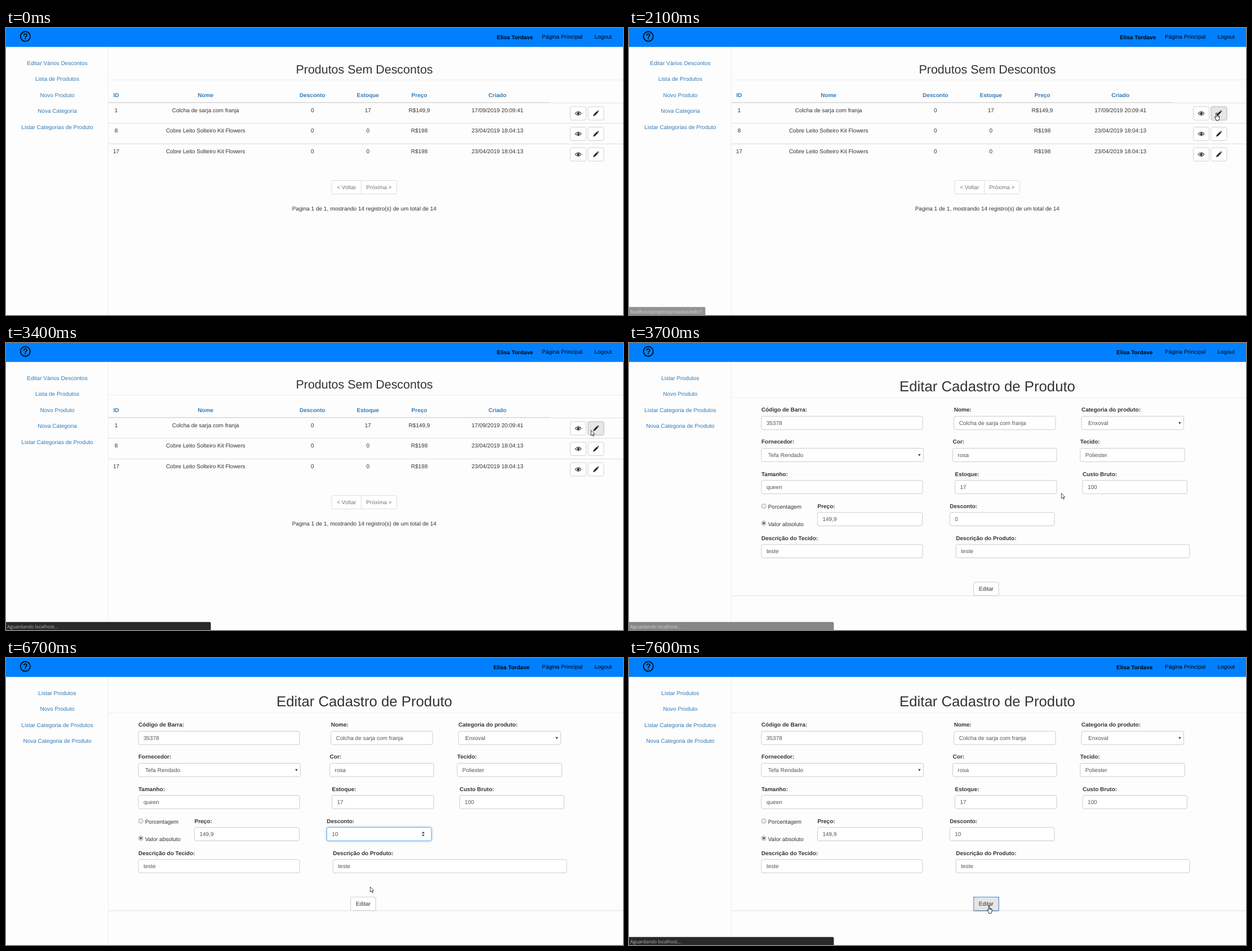
Animation, 1095 px wide and 511 px high, one loop 8000 ms. Source, as an HTML page:

```html
<!DOCTYPE html>
<html lang="pt-BR">
<head>
<meta charset="utf-8">
<title>Cadastro de produtos</title>
<style>
  html, body { margin: 0; width: 100%; height: 100%; overflow: hidden; background: #fdfdfd; }
  svg { display: block; width: 100%; height: 100%; }
  text { font: 10px "Liberation Sans", Arial, sans-serif; fill: #333; text-rendering: geometricPrecision; white-space: pre; }
  .bold { font-weight: bold; }
  .black { fill: #000; }
  .link { fill: #337ab7; }
  .muted { fill: #777; }
  .value { fill: #555; }
  .white { fill: #fff; }
  .h2 { font-size: 21.45px; }
  .h1 { font-size: 25.74px; }
  .tip { font-size: 8.6px; fill: #575757; }
  .status { font: 8.2px "Open Sans", "Noto Sans", sans-serif; fill: #b4b6b8; }
  .glow { filter: drop-shadow(0 0 2px rgba(102, 175, 233, .7)); }
</style>
</head>
<body>
<svg id="stage" viewBox="0 0 1095 511" preserveAspectRatio="none"></svg>
<script>
const LOOP = 8000, STEP = 100;
const stage = document.getElementById('stage');

const text = (x, y, str, cls = '', anchor = 'start') =>
  `<text x="${x}" y="${y}" class="${cls}" text-anchor="${anchor}">${str}</text>`;
const centered = (x, y, str, cls) => text(x, y, str, cls, 'middle');
const rect = (x, y, w, h, fill, stroke = 'none', rx = 0, extra = '') =>
  `<rect x="${x}" y="${y}" width="${w}" height="${h}" rx="${rx}" fill="${fill}" stroke="${stroke}" ${extra}/>`;
const line = (x1, y1, x2, y2, color, width = 1) =>
  `<path d="M${x1} ${y1}L${x2} ${y2}" stroke="${color}" stroke-width="${width}"/>`;
const at = (x, y, body) => `<g transform="translate(${x} ${y})">${body}</g>`;
const between = (t, a, b) => t >= a && t < b;
const ramp = (t, a, b) => Math.min(1, Math.max(0, (t - a) / (b - a)));

const eye = `<path d="M-5.4 0Q0-6.6 5.4 0Q0 6.6-5.4 0Z" fill="none" stroke="#222" stroke-width="1.1"/>
  <circle r="2.3" fill="#222"/><circle cx="-.8" cy="-.9" r=".7" fill="#fff"/>`;
const pencil = `<path d="M-5 5L-4.1 1.9 1.7-3.9 3.9-1.7-1.9 4.1ZM2.4-4.5L3.3-5.2Q3.8-5.5 4.3-5L5-4.3Q5.5-3.8 5.2-3.3L4.5-2.4Z" fill="#222"/>`;

const cursors = {
  arrow: `<path d="M.4.4V9.7L2.5 7.8 4 11.2 5.4 10.6 3.9 7.3H6.7Z" fill="#fff" stroke="#222" stroke-width=".8"/>`,
  hand: `<path d="M-.9 8.4V1Q-.9 0 0 0T.9 1V4.9L2 4.6 2.4 5.2 3.5 5 3.9 5.7 5.1 5.7V9.6Q4.9 11.2 4.1 12.1V13.6H-.6V12.2L-3.1 8.5Q-3.6 7.2-2.5 7.1Z"
    fill="#fff" stroke="#111" stroke-width=".9"/><path d="M1 5V7.4M2.5 5.3V7.4M3.9 5.8V7.4" stroke="#111" stroke-width=".7"/>`,
  beam: `<path d="M-2-6H-.4L0-5.6.4-6H2M0-5.6V5.6M-2 6H-.4L0 5.6.4 6H2" fill="none" stroke="#222" stroke-width=".9"/>`
};

// Pointer way points: time, x, y, shape
const pointerPath = [
  [200, 60, 1, 'arrow'], [300, 723, 272, 'arrow'], [400, 566, 159, 'arrow'], [500, 566, 159, 'arrow'],
  [900, 664, 171, 'arrow'], [1000, 664, 171, 'arrow'], [1200, 715, 171, 'arrow'], [1400, 840, 168, 'arrow'],
  [1600, 960, 162, 'arrow'], [1700, 1012, 157, 'hand'], [1900, 1040, 153, 'hand'], [2100, 1042.5, 151, 'hand'],
  [3300, 1038, 155, 'arrow'], [3400, 1038, 155, 'arrow'], [3500, 995, 177, 'arrow'], [3700, 767, 267, 'arrow'],
  [3800, 690, 298, 'arrow'], [3900, 645, 313, 'beam'], [4000, 631, 320, 'beam'], [4500, 0, 0, ''],
  [6100, 631, 316, 'beam'], [6200, 630, 326, 'arrow'], [6400, 626, 355, 'arrow'], [6600, 626, 355, 'arrow'],
  [6700, 646, 407, 'arrow'], [6800, 643, 428, 'hand'], [7000, 639, 441, 'hand']
];

function pointerAt(t) {
  const i = pointerPath.findLastIndex(p => p[0] <= t);
  if (i < 0) return { shape: '' };
  const [t0, x0, y0, shape] = pointerPath[i];
  const [t1, x1, y1, nextShape] = pointerPath[i + 1] || pointerPath[i];
  // A pointer that changes shape after a rest, or vanishes, stays put until then
  const k = nextShape && t1 - t0 <= 400 ? ramp(t, t0, t1 || t0 + 1) : 0;
  return { x: t1 > t0 ? x0 + (x1 - x0) * k : x0, y: t1 > t0 ? y0 + (y1 - y0) * k : y0, shape };
}

function frame(name, nameX, links, lineY) {
  return rect(0, 0, 1095, 511, '#fdfdfd') + rect(0, 0, 1095, 33.7, '#0080ff') +
    `<circle cx="34.3" cy="15" r="8.6" fill="none" stroke="#000" stroke-width="1.7"/>` +
    `<path d="M31.7 13.2Q31.7 10.5 34.3 10.5T36.9 13Q36.9 14.2 35.4 15.2Q34.3 15.9 34.3 17.2" fill="none" stroke="#000" stroke-width="1.6"/>` +
    rect(33.4, 18.3, 1.8, 1.8, '#000') +
    text(nameX, 20, name, 'bold black') + text(951, 18.6, 'Página Principal', 'black') + text(1044.5, 18.6, 'Logout', 'black') +
    line(181.5, 34, 181.5, 511, '#eee') + line(182, lineY, 1095, lineY, '#eee') +
    links.map((link, i) => centered(91, 65.6 + 28.5 * i, link, 'link')).join('');
}

function iconButton(x, y, icon, hover) {
  return rect(x, y, 28, 24, hover ? '#e6e6e6' : '#fff', hover ? '#adadad' : '#ccc', 2.8, 'stroke-width=".9"') +
    at(x + 14, y + 12, icon);
}

const columns = [195.5, 354.2, 543.8, 642.2, 733.5, 872.2];
const headings = ['ID', 'Nome', 'Desconto', 'Estoque', 'Preço', 'Criado'];
const products = [
  ['1', 'Colcha de sarja com franja', '0', '17', 'R$149,9', '17/09/2019 20:09:41'],
  ['8', 'Cobre Leito Solteiro Kit Flowers', '0', '0', 'R$198', '23/04/2019 18:04:13'],
  ['17', 'Cobre Leito Solteiro Kit Flowers', '0', '0', 'R$198', '23/04/2019 18:04:13']
];

function listPage(t, pointer) {
  const cells = (row, y, cls) => row.map((cell, i) => centered(columns[i], y, cell, cls)).join('');
  const over = (row, left) => row === 0 && pointer.shape && t >= 1600 && between(pointer.x, left, left + 28);
  return frame('Elisa Tordave', 871, ['Editar Vários Descontos', 'Lista de Produtos', 'Novo Produto',
      'Nova Categoria', 'Listar Categorias de Produto'], 92.5) +
    centered(636, 81.2, 'Produtos Sem Descontos', 'h2') +
    cells(headings, 122.7, 'bold link') +
    line(182, 132.7, 966, 132.7, '#d6d6d6', 1.4) + line(966, 133.5, 1095, 133.5, '#e2e2e2') +
    line(182, 169.6, 1095, 169.6, '#ddd') + line(182, 206.3, 1095, 206.3, '#ddd') +
    products.map((row, i) => {
      const y = 140 + 36.5 * i;
      return cells(row, y + 9.6) + iconButton(1001.5, y, eye, over(i, 1001.5)) + iconButton(1033, y, pencil, over(i, 1033));
    }).join('') +
    rect(578, 271.5, 115.5, 24, '#fff', '#ddd', 2.8) + line(630.5, 271.5, 630.5, 295.5, '#ddd') +
    centered(604.3, 286.6, '&lt; Voltar', 'muted') + centered(661.8, 286.6, 'Próxima &gt;', 'muted') +
    centered(635.8, 324.6, 'Pagina 1 de 1, mostrando 14 registro(s) de um total de 14') +
    (between(t, 2400, 2800) ? rect(1048.5, 161.5, 33, 17, '#fff', '#767676') + centered(1065, 173, 'Editar', 'tip') : '');
}

// Form fields: row, left, right, label, value, is a select
const fields = [
  [0, 235, 521, 'Código de Barra:', '35378'],
  [0, 576.7, 757, 'Nome:', 'Colcha de sarja com franja'],
  [0, 803, 984.5, 'Categoria do produto:', 'Enxoval', true],
  [1, 235, 522.5, 'Fornecedor:', 'Tefa Rendado', true],
  [1, 574.6, 759, 'Cor:', 'rosa'],
  [1, 800.8, 986.3, 'Tecido:', 'Poliester'],
  [2, 235, 521, 'Tamanho:', 'queen'],
  [2, 578.5, 759, 'Estoque:', '17'],
  [2, 805, 990.4, 'Custo Bruto:', '100'],
  [3, 334.5, 520.5, 'Preço:', '149,9'],
  [4, 235, 521, 'Descrição do Tecido:', 'teste'],
  [4, 580.3, 995, 'Descrição do Produto:', 'teste']
];

function field([row, left, right, label, value, isSelect]) {
  const y = 130.4 + 57.1 * row;
  return text(left, y - 8.1, label, 'bold') + rect(left, y, right - left, 23.8, '#fff', '#ccc', 2.8) +
    text(left + (isSelect ? 12 : 9), y + 15.1, value, 'value') +
    (isSelect ? `<path d="M${right - 9.4} ${y + 10.3}h4.6l-2.3 4z" fill="#444"/>` : '');
}

function radio(y, label, checked) {
  return `<circle cx="239.2" cy="${y}" r="4" fill="#eee" stroke="#999" stroke-width=".9"/>` +
    (checked ? `<circle cx="239.2" cy="${y}" r="2.1" fill="#555"/>` : '') + text(246.7, y + 4.8, label);
}

function discountField(t) {
  const value = t < 4900 ? '0' : t < 5400 ? '' : t < 5600 ? '1' : '10';
  const focus = Math.min(ramp(t, 4100, 4300), 1 - ramp(t, 6900, 7100));
  const selected = between(t, 4500, 4900);
  const caretX = between(t, 4900, 5000) ? 578.5 : between(t, 6100, 6200) ? 589.3 : 0;
  return field([3, 569.3, 755, 'Desconto:', '']) +
    (focus ? rect(569.3, 301.7, 185.7, 23.8, '#fff', '#66afe9', 2.8, `class="glow" opacity="${focus}"`) : '') +
    (selected ? rect(578.3, 307, 5.6, 12, '#3390ff') : '') +
    text(578.3, 316.8, value, selected ? 'white' : 'value') +
    (caretX ? line(caretX, 307, caretX, 319, '#333', .8) : '') +
    (between(t, 4000, 7000) ? `<path d="M737.8 312.2l2.6-3.2 2.6 3.2zM737.8 314.4l2.6 3.2 2.6-3.2z" fill="#444"/>` : '');
}

function formPage(t) {
  const hover = t >= 6800, pressed = t >= 7000;
  return frame('Elisa Tordave', 865, ['Listar Produtos', 'Novo Produto', 'Listar Categoria de Produtos',
      'Nova Categoria de Produto'], 97.5) +
    centered(636, 85.7, 'Editar Cadastro de Produto', 'h1') +
    fields.map(field).join('') + discountField(t) +
    radio(290.4, 'Porcentagem', false) + radio(320.8, 'Valor absoluto', true) +
    line(182, 450, 1095, 450, '#ddd') +
    rect(611.7, 425.7, 44.4, 24, hover ? '#e6e6e6' : '#fff', pressed ? '#8c8c8c' : hover ? '#adadad' : '#ccc', 2.8) +
    (pressed ? rect(611.5, 425.5, 45, 25, 'none', '#5e9bea', .5) : '') +
    centered(633.8, 440.8, 'Editar');
}

function statusBar(t) {
  const waiting = t >= 3300;
  const opacity = t >= 7600 ? 1 : waiting ? 1 - ramp(t, 3500, 3950) : ramp(t, 1900, 2300);
  if (!opacity) return '';
  const right = waiting ? 363.5 : 135.5;
  return `<g opacity="${opacity}"><path d="M0 496.8H${right - 2}q2 0 2 2V511H0Z" fill="#292a2c"/>` +
    text(2.3, 507.6, waiting ? 'Aguardando localhost...' : 'localhost/projeto/produtos/edit/1', 'status') + '</g>';
}

function render(t) {
  const pointer = pointerAt(t);
  return (t < 3500 ? listPage(t, pointer) : formPage(t)) + statusBar(t) +
    (pointer.shape ? at(pointer.x, pointer.y, cursors[pointer.shape]) : '');
}

const start = performance.now();
let shown = -1;
function tick() {
  const t = Math.floor((performance.now() - start) % LOOP / STEP) * STEP;
  if (t !== shown) stage.innerHTML = render(shown = t);
  requestAnimationFrame(tick);
}
tick();
</script>
</body>
</html>
```
